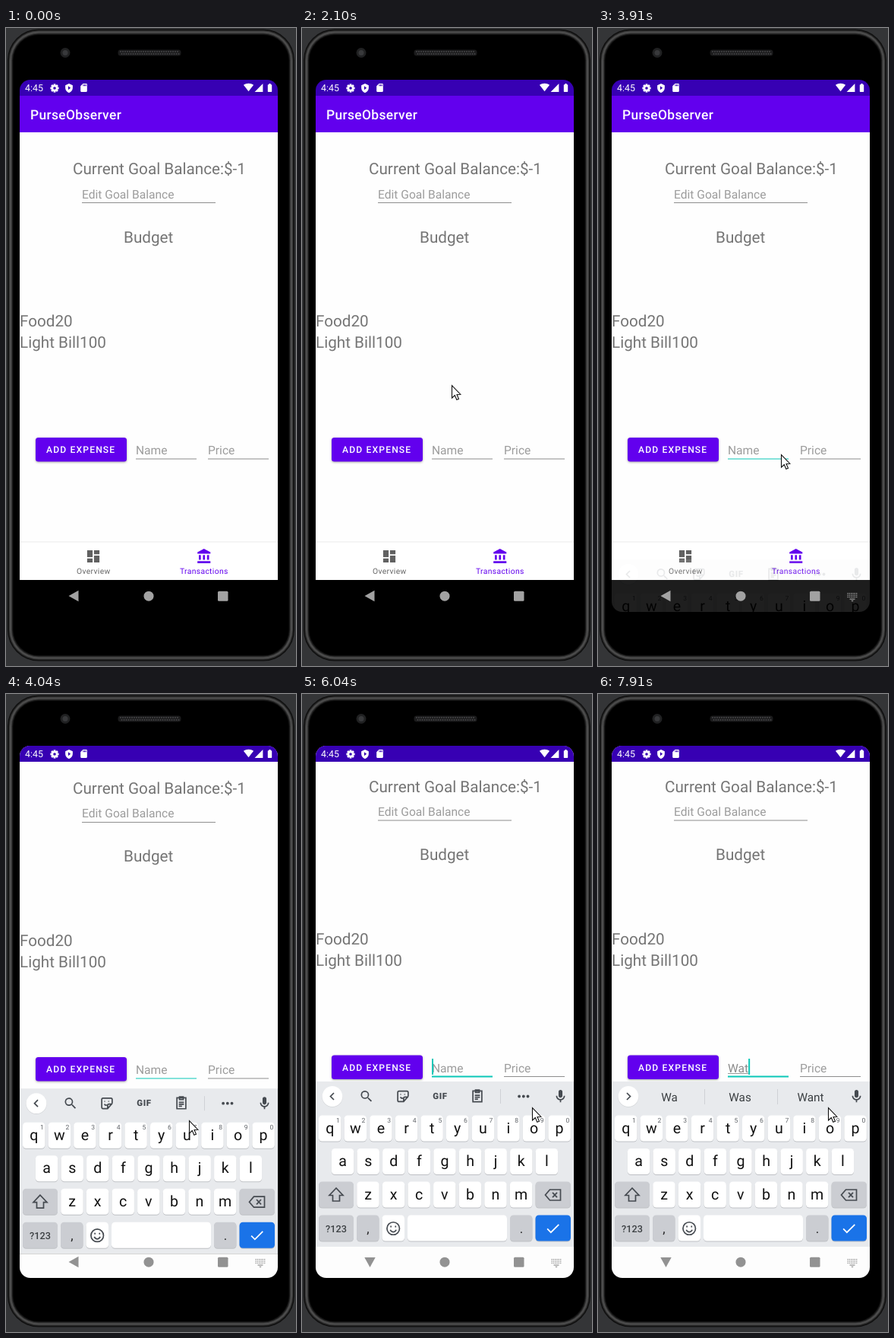
These frames come from a looping animation (382x838 px, 8000 ms). An HTML page with a canvas:

```html
<!DOCTYPE html>
<html lang="en">
<head>
<meta charset="utf-8">
<title>Budget app</title>
<style>
html, body { margin: 0; width: 100%; height: 100%; overflow: hidden; background: #343537; }
canvas { display: block; width: 382px; height: 838px; }
</style>
</head>
<body>
<canvas id="stage"></canvas>
<script>
const W = 382, H = 838, LOOP = 8000;
const dpr = window.devicePixelRatio || 1;
const stage = document.getElementById('stage');
const layer = document.createElement('canvas');
for (const el of [stage, layer]) {
  el.width = W * dpr;
  el.height = H * dpr;
}
const main = stage.getContext('2d'), sheet = layer.getContext('2d');
let c = main;

const PURPLE = '#6200ee', TEAL = '#0ac8b8', INK = '#454a50', GREY = '#757575', HINT = '#9c9c9c';
const PAN = 63.5, SLIDE = 189, KB_START = 3910;

const icons = {
  dashboard: 'M3 13h8V3H3zM3 21h8v-6H3zM13 21h8V11h-8zM13 3v6h8V3z',
  bank: 'M4 10v7h3v-7zM10 10v7h3v-7zM2 22h19v-3H2zM16 10v7h3v-7zM11.5 1L2 6v2h19V6z',
  shield: 'M12 1L3 5v6c0 5.55 3.84 10.74 9 12 5.16-1.26 9-6.45 9-12V5zM10 7v9l6-4.5z',
  card: 'M18 2h-8L4 8v12c0 1.1.9 2 2 2h12c1.1 0 2-.9 2-2V4c0-1.1-.9-2-2-2zM12 8h-2V4h2zM15 8h-2V4h2zM18 8h-2V4h2z',
  wifi: 'M12 3C7.8 3 3.7 4.4.4 6.5L12 21 23.6 6.5C20.3 4.4 16.2 3 12 3z',
  signal: 'M2 22h20V2z',
  battery: 'M15.7 4H14V2h-4v2H8.3C7.6 4 7 4.6 7 5.3v15.4C7 21.4 7.6 22 8.3 22h7.4c.7 0 1.3-.6 1.3-1.3V5.3C17 4.6 16.4 4 15.7 4z',
  search: 'M15.5 14h-.8l-.3-.3A6.5 6.5 0 1 0 13.7 14.4l.3.3v.8l5 5 1.5-1.5zM9.5 14A4.5 4.5 0 1 1 9.5 5 4.5 4.5 0 0 1 9.5 14z',
  mic: 'M12 14c1.66 0 3-1.34 3-3V5a3 3 0 0 0-6 0v6c0 1.66 1.34 3 3 3zM17 11a5 5 0 0 1-10 0H5c0 3.53 2.6 6.43 6 6.92V21h2v-3.08c3.4-.49 6-3.39 6-6.92z',
  sticker: 'M20 12V6a2 2 0 0 0-2-2H6a2 2 0 0 0-2 2v12a2 2 0 0 0 2 2h7l7-8M13 20v-5a2 2 0 0 1 2-2h5M8 9h1M14 9h1M8 13c1 2 3 2 4 1.5',
  clip: 'M5 4h14v17H5zM9 2.5h6v4H9zM8 11h8M8 14h8M8 17h5',
  shift: 'M12 3L3 12.5h4.5V20h9v-7.5H21z',
  back: 'M8 5h14v14H8L2 12zM11.5 8.8l6 6.4M17.5 8.8l-6 6.4',
  smile: 'M21.5 12a9.5 9.5 0 1 1-19 0 9.5 9.5 0 1 1 19 0M7.5 14c2 4.5 7 4.5 9 0M8.5 8v2.2M15.5 8v2.2',
  check: 'M4 12.5l5 5L20 6.5'
};
for (const k in icons) icons[k] = new Path2D(icons[k]);

// Draws a 24-unit icon centred on x, y; a line width makes it an outline.
function icon(name, x, y, s, color, line) {
  c.save();
  c.translate(x - 12 * s, y - 12 * s);
  c.scale(s, s);
  if (line) {
    c.lineWidth = line / s;
    c.strokeStyle = color;
    c.stroke(icons[name]);
  } else {
    c.fillStyle = color;
    c.fill(icons[name], 'evenodd');
  }
  c.restore();
}
function rect(x, y, w, h, color) {
  c.fillStyle = color;
  c.fillRect(x, y, w, h);
}
function round(x, y, w, h, r, color) {
  c.beginPath();
  c.roundRect(x, y, w, h, r);
  c.fillStyle = color;
  c.fill();
}
function disc(x, y, r, color) {
  c.beginPath();
  c.arc(x, y, r, 0, 7);
  c.fillStyle = color;
  c.fill();
}
function poly(points, color) {
  c.beginPath();
  points.forEach(([x, y]) => c.lineTo(x, y));
  c.closePath();
  c.fillStyle = color;
  c.fill();
}
function text(s, x, y, size, color, { align = 'left', weight = 400, gap = 0 } = {}) {
  c.font = `${weight} ${size}px Roboto, sans-serif`;
  c.letterSpacing = gap + 'px';
  c.textRendering = 'geometricPrecision';
  c.textAlign = align;
  c.fillStyle = color;
  c.fillText(s, x, y);
}

function phone() {
  rect(0, 0, W, H, '#343537');
  // The metal rim fades from a dark edge to a soft highlight and into black.
  for (let i = 0; i <= 7; i++) {
    const v = Math.round(14 + 66 * Math.sin(Math.PI * i / 7) ** 2);
    round(2 + i, 1.5 + i, 378 - 2 * i, 830 - 2 * i, 41 - i, `rgb(${v},${v},${v})`);
  }
  round(9.5, 9, 363, 815, 34, '#000');
  disc(78, 32.5, 6.5, '#202122');
  disc(78, 32.5, 3.5, '#38393b');
  round(147.5, 28.5, 83, 8, 3.5, '#1b1b1c');
  for (let i = 0; i < 26; i++)
    for (let j = 0; j < 2; j++) disc(151 + i * 3 + j * 1.5, 31 + j * 3, 1, '#454546');
}

function statusBar() {
  rect(18, 68, 340, 21, '#3700b3');
  text('4:45', 25, 83, 12.4, '#fff');
  for (let i = 0; i < 8; i++) {
    c.save();
    c.translate(64, 79);
    c.rotate(i * Math.PI / 4);
    rect(-1.4, -5.6, 2.8, 4, '#fff');
    c.restore();
  }
  disc(64, 79, 4.3, '#fff');
  disc(64, 79, 1.8, '#3700b3');
  icon('shield', 83, 79, 0.54, '#fff');
  icon('card', 102.5, 78.5, 0.54, '#fff');
  icon('wifi', 319.5, 78, 0.57, '#fff');
  icon('signal', 333, 78.5, 0.54, '#fff');
  icon('battery', 347.5, 78.5, 0.54, '#fff');
}

function typed(t) {
  return t < 6900 ? '' : t < 7200 ? 'W' : t < 7850 ? 'Wa' : 'Wat';
}
function caretOn(t) {
  if (t < 4100) return false;
  if (t >= 6840) return true;
  return t < 4580 || (t >= 5040 && t < 5570) || (t >= 6040 && t < 6570);
}

function nameField(t) {
  const word = typed(t);
  text(word || 'Name', 171, 560, 15.6, word ? '#8c8c8c' : HINT);
  const end = 171 + (word ? c.measureText(word).width : 0);
  if (word.length > 1) rect(171, 561.5, end - 171, 1, '#9a9a9a');
  const focused = t >= 4100;
  const pressed = (t >= 2860 && t < 3420) || t >= 3740;
  if (focused) rect(171, 565, 80, 2, TEAL);
  else rect(171, 565.5, 80, 1, pressed ? TEAL : '#8e8e8e');
  if (caretOn(t)) rect(end, 542.5, 2, 21, TEAL);
}

function app(t, pan) {
  c.save();
  c.translate(0, -pan);
  rect(18, 89, 340, 636, '#fefefe');
  rect(18, 89, 340, 48, PURPLE);
  text('PurseObserver', 32, 120, 17.4, '#fff', { weight: 500, gap: 0.35 });
  text('Current Goal Balance:$-1', 88, 192, 20.7, GREY);
  text('Edit Goal Balance', 100, 223.5, 15.6, HINT);
  rect(100, 229, 176, 1, '#8e8e8e');
  text('Budget', 155, 281.5, 20.7, GREY);
  text('Food20', 18, 392, 20.7, GREY);
  text('Light Bill100', 18, 420, 20.7, GREY);
  c.save();
  c.shadowColor = 'rgba(0,0,0,.35)';
  c.shadowBlur = 3 * dpr;
  c.shadowOffsetY = dpr;
  round(39, 538, 120, 31.5, 3.5, PURPLE);
  c.restore();
  text('ADD EXPENSE', 53, 558.3, 12.1, '#fff', { weight: 500, gap: 1.15 });
  nameField(t);
  text('Price', 266, 560, 15.6, HINT);
  rect(266, 565.5, 80, 1, '#8e8e8e');

  rect(18, 674.5, 340, 1.2, '#ececec');
  rect(18, 675.7, 340, 49.3, '#fff');
  icon('dashboard', 115, 694, 0.9, '#616161');
  text('Overview', 93, 716.5, 10.35, '#666', { gap: 0.33 });
  icon('bank', 261.2, 694, 0.9, PURPLE);
  text('Transactions', 229, 716.5, 10.35, PURPLE, { gap: 0.33 });
  c.restore();
}

function key(x, y, w, color = '#fff', h = 34) {
  round(x, y + 1, w, h, 4.5, '#bfc1c5');
  round(x, y, w, h, 4.5, color);
}

function toolbar(t) {
  const suggest = t >= 7200;
  disc(40, 529.2, 13.6, '#d4d6d9');
  disc(40, 528.5, 13.4, '#fff');
  const d = suggest ? 1 : -1;
  c.strokeStyle = INK;
  c.lineWidth = 1.7;
  c.beginPath();
  c.moveTo(40 - 2 * d, 524);
  c.lineTo(40 + 2.5 * d, 528.5);
  c.lineTo(40 - 2 * d, 533);
  c.stroke();
  if (suggest) {
    ['Wa', 'Was', 'Want'].forEach((s, i) => text(s, 94 + 93 * i, 534.5, 15.3, '#3c4043', { align: 'center' }));
    rect(140, 519, 1, 20, '#cfd1d5');
    rect(236, 519, 1, 20, '#cfd1d5');
  } else {
    icon('search', 85, 528.5, 0.83, INK);
    icon('sticker', 133, 528.5, 0.86, INK, 1.7);
    text('GIF', 182, 532.3, 11.4, INK, { align: 'center', weight: 900, gap: 0.7 });
    icon('clip', 231, 528, 0.84, INK, 1.7);
    rect(261, 519, 1, 19, '#cfd1d5');
    for (let i = -1; i < 2; i++) disc(291.8 + i * 5.7, 528.5, 1.9, INK);
  }
  icon('mic', 340.5, 528.5, 0.85, INK);
}

function keys(t) {
  rect(18, 509, 340, 217, '#e8eaed');
  rect(18, 726, 340, 50, '#fdfdfd');
  toolbar(t);
  const caps = t >= 6840 && t < 6900;
  const rows = [['qwertyuiop', 36.7, 553.5], ['asdfghjkl', 53.6, 597], ['zxcvbnm', 87, 640.5]];
  rows.forEach(([letters, x0, y], r) => {
    [...letters].forEach((ch, i) => {
      const x = x0 + i * 33.6;
      key(x - 14.7, y, 29.4);
      text(caps ? ch.toUpperCase() : ch, x, y + 23.3, 19.6, '#111', { align: 'center' });
      if (r === 0) text(String((i + 1) % 10), x + 10.7, y + 9.5, 8.6, '#5f6368', { align: 'center' });
    });
  });
  const dark = '#cbcdd2';
  key(22, 640.5, 46, dark);
  icon('shift', 45, 658, 1, INK, 1.7);
  key(307.5, 640.5, 46.5, dark);
  icon('back', 330.5, 658, 1, INK, 1.7);
  key(22, 684.5, 46, dark);
  text('?123', 45, 706.8, 12.7, '#3c4043', { align: 'center', weight: 500 });
  key(72, 684.5, 29.5, dark);
  text(',', 87, 708, 17, '#222', { align: 'center' });
  key(105.5, 684.5, 29.5);
  icon('smile', 120.2, 702, 0.87, INK, 1.7);
  key(139, 684.5, 131);
  key(274, 684.5, 29.5, dark);
  text('.', 289, 708, 17, '#222', { align: 'center' });
  key(307.5, 684.5, 46.5, '#1a73e8');
  icon('check', 330.7, 702, 0.95, '#fff', 1.7);
}

// The keyboard is drawn on its own layer so that it fades in as one piece.
function keyboard(t, off, alpha) {
  c = sheet;
  c.setTransform(dpr, 0, 0, dpr, 0, 0);
  c.clearRect(0, 0, W, H);
  c.translate(0, off);
  keys(t);
  c = main;
  c.globalAlpha = alpha;
  c.drawImage(layer, 0, 0, W, H);
  c.globalAlpha = 1;
}

function navBar(t) {
  const color = t < KB_START + 65 ? '#a2a2a2' : '#929292';
  const turn = Math.min(1, Math.max(0, (t - 4080) / 280));
  c.save();
  c.translate(89.5, 746);
  c.rotate(-turn * Math.PI / 2);
  poly([[-7, 0], [6, -7.2], [6, 7.2]], color);
  c.restore();
  disc(188, 746.2, 6.5, color);
  round(279, 739.8, 13.5, 13, 1.5, color);
  if (t < KB_START) return;
  for (let r = 0; r < 3; r++)
    for (let i = 0; i < 6; i++) rect(328.5 + i * 2.3, 742 + r * 2.4, 1.3, 1.3, color);
  rect(331.5, 749.5, 7, 1.2, color);
  poly([[333.2, 751.8], [336.8, 751.8], [335, 753.5]], color);
}

const path = [
  [240, 306, 759], [850, 209, 510], [1120, 209, 510], [1330, 345, 540], [1600, 243, 404],
  [1890, 48, 362], [1960, 56, 366], [2100, 197, 469], [2380, 213, 542], [2720, 212, 529],
  [2860, 212, 529], [2920, 212, 543], [3290, 212, 543], [3530, 330, 730], [3770, 241, 560],
  [4090, 241, 560], [4380, 303, 543], [LOOP, 303, 543]
];
function pointer(t) {
  if (t < 240) return;
  // The pointer is sampled about fifteen times a second.
  const step = 66.6;
  const s = Math.max(240, 2100 + Math.floor((t - 2100) / step + 0.02) * step);
  const i = Math.max(1, path.findIndex(p => p[0] > s));
  const [t0, x0, y0] = path[i - 1], [t1, x1, y1] = path[i];
  const u = (s - t0) / (t1 - t0), e = u * u * (3 - 2 * u);
  c.save();
  c.translate(x0 + (x1 - x0) * e + 0.5, y0 + (y1 - y0) * e + 0.5);
  poly([[0, 0], [0, 16.5], [3.8, 13], [6.3, 18.8], [9, 17.7], [6.5, 12], [11.3, 11.7]], '#fff');
  c.strokeStyle = '#111';
  c.lineWidth = 1.1;
  c.stroke();
  c.restore();
}

function draw(t) {
  c.setTransform(dpr, 0, 0, dpr, 0, 0);
  phone();
  c.save();
  c.beginPath();
  c.roundRect(18, 68, 340, 699, 14);
  c.clip();
  const age = Math.floor((t - KB_START) / 65) * 65;
  const left = tau => age < 0 ? 1 : age > 300 ? 0 : Math.exp(-age / tau);
  app(t, PAN * (1 - left(40)));
  rect(18, 725, 340, 42, '#000');
  if (age >= 0) keyboard(t, SLIDE * left(43), Math.min(1, 0.12 + age / 90));
  navBar(t);
  statusBar();
  c.restore();
  pointer(t);
}

const start = performance.now();
function tick() {
  draw((performance.now() - start) % LOOP);
  requestAnimationFrame(tick);
}
tick();
</script>
</body>
</html>
```
